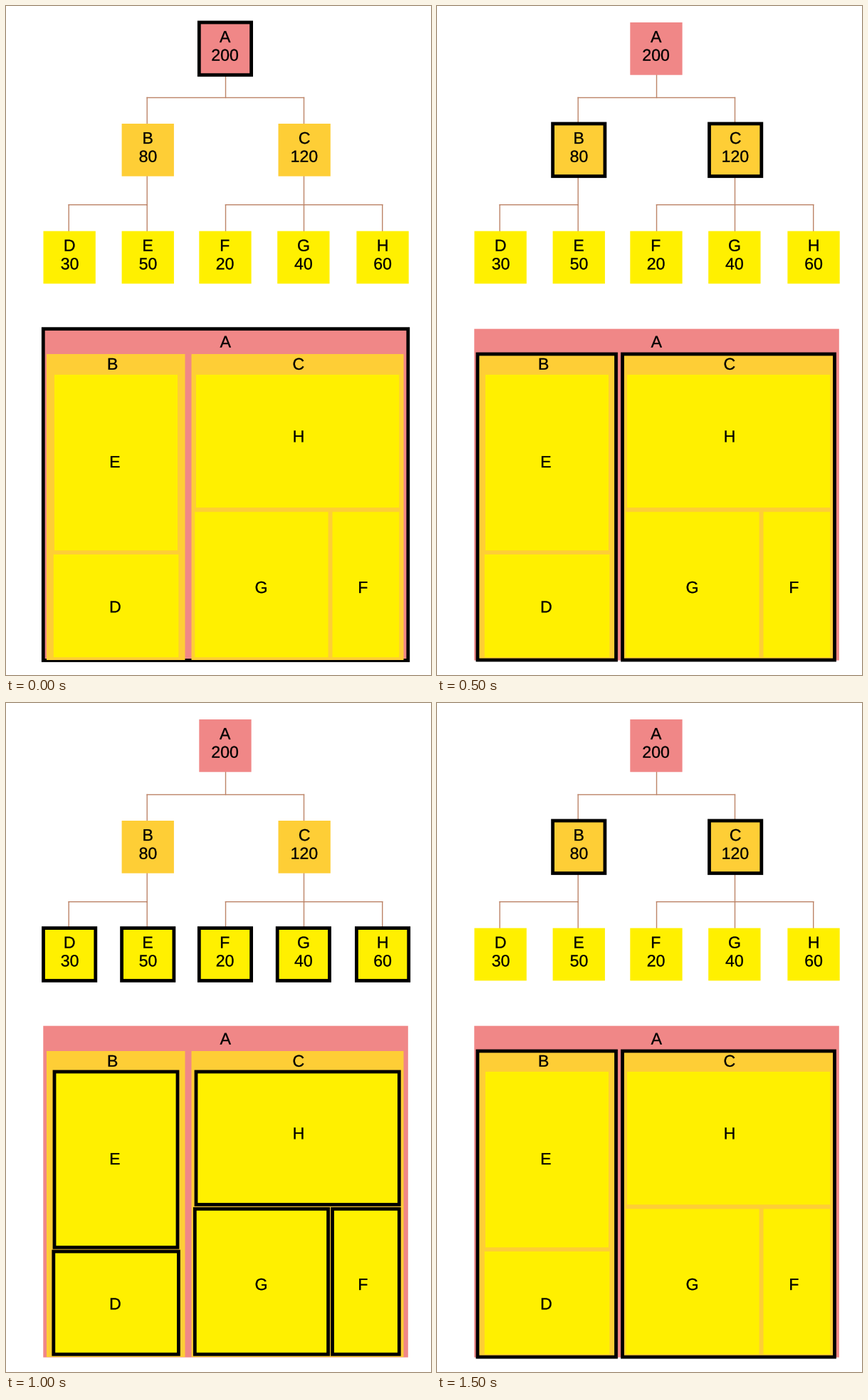
Recreate the animation shown at these times as a matplotlib script. Size 597x938 px, loop 2 s.

```python
import matplotlib.pyplot as plt
from matplotlib.animation import FuncAnimation
from matplotlib.patches import PathPatch, Rectangle
from matplotlib.textpath import TextPath
from matplotlib.transforms import Affine2D

W, H, DPI = 597, 938, 100
PX = 72 / DPI  # points per pixel

COLORS = ["#f08787", "#fece36", "#fff000"]
LINE = "#bd8468"
LEVEL = dict(A=0, B=1, C=1, D=2, E=2, F=2, G=2, H=2)
VALUE = dict(A=200, B=80, C=120, D=30, E=50, F=20, G=40, H=60)
SEQUENCE = [0, 1, 2, 1]  # highlighted level at each step

# Tree: left edge of box and text centre; top edge per level
TREE_X = dict(A=(271.3, 307.7), B=(162.6, 199.5), C=(382.5, 419.3),
              D=(52.5, 89.6), E=(162.6, 199.5), F=(271.3, 307.7),
              G=(381.2, 417.7), H=(492.4, 529.2))
TREE_Y = [23, 165, 315.6]
BOX = 73.3

# Treemap: left, top, right, bottom, then label centre and baseline
MAP = dict(A=(52.3, 452.7, 564.8, 917.5, 308.3, 478.7),
           B=(57, 488, 251.5, 917, 150, 509.8),
           C=(260.5, 488, 558.5, 917, 411, 509.8),
           E=(68, 517, 241, 763.3, 153.3, 647),
           D=(66.8, 769, 242.4, 913.2, 153.8, 850.3),
           H=(267, 517, 552.3, 703.3, 411, 611.3),
           G=(265.3, 709.3, 452.6, 913.2, 358.3, 823),
           F=(458.5, 709.3, 552.3, 913.2, 501.8, 823))

fig = plt.figure(figsize=(W / DPI, H / DPI), dpi=DPI, facecolor="white")
ax = fig.add_axes([0, 0, 1, 1])
ax.set_xlim(0, W)
ax.set_ylim(H, 0)
ax.axis("off")

borders = [[], [], []]


def label(x, y, text):
    """Text outline centred on x, so it can sit between whole pixels."""
    glyphs = TextPath((0, 0), text, size=23.1, prop={"family": "Liberation Sans"})
    ink = glyphs.get_extents()
    place = Affine2D().scale(1, -1).translate(x - (ink.x0 + ink.x1) / 2, y)
    ax.add_patch(PathPatch(glyphs.transformed(place), fc="black", ec="black",
                           lw=0.3 * PX, snap=False, zorder=9))


def box(x0, y0, x1, y1, level):
    """Filled box with an outline that can be switched on."""
    z = 2 + level
    size = (x1 - x0, y1 - y0)
    ax.add_patch(Rectangle((x0, y0), *size, fc=COLORS[level], lw=0,
                           snap=False, zorder=z))
    edge = Rectangle((x0, y0), *size, fill=False, ec="black", lw=4.8 * PX,
                     joinstyle="miter", snap=False, zorder=z + 0.5)
    borders[level].append(ax.add_patch(edge))


def branch(x, top, mid, bottom, children):
    """Stem from a parent, crossbar and drops to its children."""
    style = dict(color=LINE, lw=1.4 * PX, zorder=1, snap=False,
                 solid_capstyle="projecting")
    ax.plot([x, x], [top, mid], **style)
    ax.plot([min(children + [x]), max(children + [x])], [mid, mid], **style)
    for c in children:
        ax.plot([c, c], [mid, bottom], **style)


branch(308.5, 96, 128.5, 166, [198.2, 418.5])
branch(198.2, 238, 278.7, 317, [88.2, 198.2])
branch(418.5, 238, 278.7, 317, [308.5, 418.5, 528.7])

for name, level in LEVEL.items():
    left, cx = TREE_X[name]
    top = TREE_Y[level]
    box(left, top, left + BOX, top + BOX + 0.4, level)
    label(cx, top + 28, name)
    label(cx, top + 53.7, str(VALUE[name]))

    x0, y0, x1, y1, tx, ty = MAP[name]
    box(x0, y0, x1, y1, level)
    label(tx, ty, name)


def update(i):
    for level, group in enumerate(borders):
        for edge in group:
            edge.set_visible(level == SEQUENCE[i])
    return sum(borders, [])


anim = FuncAnimation(fig, update, frames=len(SEQUENCE), interval=500,
                     repeat=True, repeat_delay=0)
plt.show()
```
